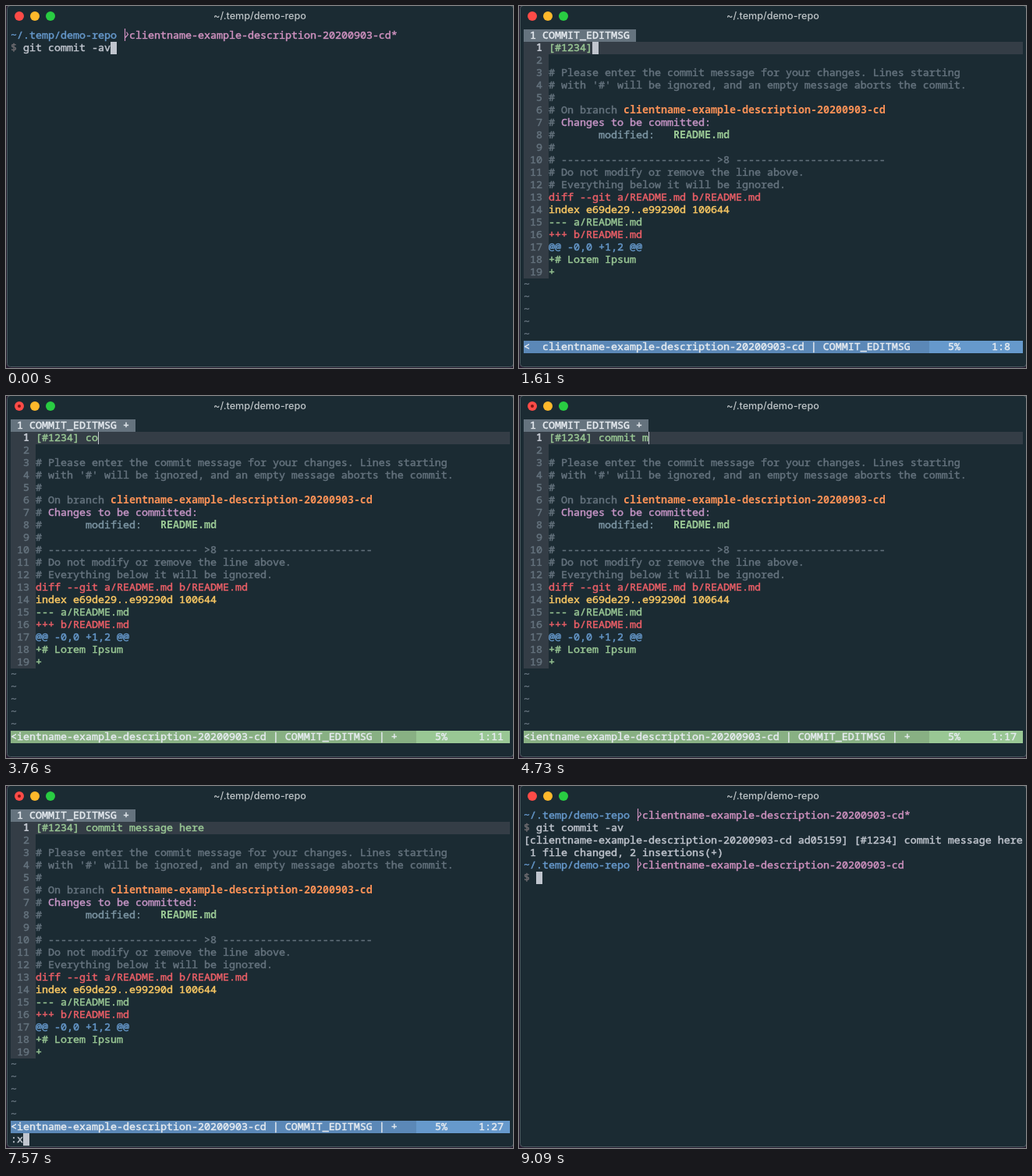
These frames come from a looping animation (650 px wide and 465 px high, 9810 ms). An HTML page with a canvas:

```html
<!DOCTYPE html>
<html lang="en">
<head>
<meta charset="utf-8">
<title>Commit demo</title>
<style>
html, body { margin: 0; width: 100%; height: 100%; overflow: hidden; background: #1b2b33; }
canvas { display: block; }
</style>
</head>
<body>
<canvas id="stage" width="650" height="465"></canvas>
<script>
const ctx = document.getElementById('stage').getContext('2d');
const LOOP = 9810;
const MONO = '13.333px "Noto Sans Mono", "DejaVu Sans Mono", monospace';
const C = {
  bg: '#1b2b33', band: '#343d46', grey: '#65737e', text: '#c0c5ce', white: '#e6ebf0',
  red: '#ec5f67', orange: '#f99157', yellow: '#fac863', green: '#99c794',
  blue: '#6699cc', violet: '#c594c5', pink: '#d092c0', slate: '#7c95a3'
};
const BRANCH = 'clientname-example-description-20200903-cd';
const TICKET = '[#1234] ';
const MESSAGE = 'commit message here';
// Times at which another character shows up; two arrive together at 5340.
const KEYS = [3580, 3760, 3840, 4020, 4110, 4190, 4280, 4730, 4820, 4990,
  5080, 5250, 5340, 5340, 5520, 5690, 5780, 5860, 5950];

// Each line is a list of [column, text, colour, bold].
const rule = '-'.repeat(24);
const hash = [0, '#', C.grey];
const note = s => [[0, '# ' + s, C.grey]];
const BUFFER = [
  [],
  note('Please enter the commit message for your changes. Lines starting'),
  note("with '#' will be ignored, and an empty message aborts the commit."),
  [hash],
  [...note('On branch'), [12, BRANCH, C.orange, true]],
  [hash, [2, 'Changes to be committed:', C.violet]],
  [hash, [8, 'modified:', C.slate], [20, 'README.md', C.green, true]],
  [hash],
  note(`${rule} >8 ${rule}`),
  note('Do not modify or remove the line above.'),
  note('Everything below it will be ignored.'),
  [[0, 'diff --git a/README.md b/README.md', C.red]],
  [[0, 'index e69de29..e99290d 100644', C.yellow]],
  [[0, '--- a/README.md', C.green]],
  [[0, '+++ b/README.md', C.red]],
  [[0, '@@ -0,0 +1,2 @@', C.blue]],
  [[0, '+# Lorem Ipsum', C.green]],
  [[0, '+', C.green]]
];

// Character grid: cells of 8 by 16 pixels.
const cellX = col => 6 + col * 8;
const cellY = row => 30 + row * 16;

function fill(col, row, cols, rows, color) {
  ctx.fillStyle = color;
  ctx.fillRect(cellX(col), cellY(row), cols * 8, rows * 16);
}

// Regular text gets a hairline outline for a medium weight.
function print(col, row, text, color, bold) {
  const x = cellX(col), y = cellY(row) + 12;
  ctx.font = (bold ? '700 ' : '400 ') + MONO;
  ctx.textAlign = 'left';
  ctx.fillStyle = ctx.strokeStyle = color;
  ctx.lineWidth = 0.45;
  ctx.fillText(text, x, y);
  if (!bold) ctx.strokeText(text, x, y);
}

function block(col, row) {
  fill(col, row, 1, 1, C.text);
}

function dot(x, y, r, color) {
  ctx.fillStyle = color;
  ctx.beginPath();
  ctx.arc(x, y, r, 0, 7);
  ctx.fill();
}

function drawWindow(busy) {
  ctx.fillStyle = '#251a2e';
  ctx.fillRect(0, 0, 650, 465);
  ctx.beginPath();
  ctx.roundRect(1.5, -0.5, 649, 464, 4);
  ctx.fillStyle = C.bg;
  ctx.fill();
  ctx.strokeStyle = '#4c5a61';
  ctx.lineWidth = 1;
  ctx.stroke();
  dot(17, 13, 6, '#fc4b47');
  dot(37, 13, 6, '#fdb92b');
  dot(57, 13, 6, '#29cc42');
  if (busy) dot(17, 13, 2, '#7e1512');
  ctx.font = '500 12.6px Inter, "Open Sans", sans-serif';
  ctx.textAlign = 'center';
  ctx.fillStyle = '#bfc5c8';
  ctx.fillText('~/.temp/demo-repo', 325.5, 17);
}

function drawPrompt(row, dirty) {
  const y = cellY(row);
  print(0, row, '~/.temp/demo-repo', C.blue);
  ctx.strokeStyle = C.pink;
  ctx.lineWidth = 1.2;
  ctx.beginPath();
  ctx.moveTo(152.5, y - 1);
  ctx.lineTo(152.5, y + 15);
  ctx.moveTo(153, y + 10.5);
  ctx.lineTo(156.5, y + 6.5);
  ctx.lineTo(154.5, y + 3.5);
  ctx.stroke();
  print(19, row, BRANCH + (dirty ? '*' : ''), C.pink);
  print(0, row + 1, '$', '#6e6c70');
}

function drawShell(t) {
  drawPrompt(0, true);
  print(2, 1, 'git commit -av', C.text);
  if (t < 1340) return block(16, 1);
  if (t < 1430) return block(0, 2);
  print(0, 2, `[${BRANCH} ad05159] ${TICKET}${MESSAGE}`, C.text);
  print(0, 3, ' 1 file changed, 2 insertions(+)', C.text);
  if (t < 8290) return block(0, 4);
  drawPrompt(4, t < 9000);
  block(2, 5);
}

function drawStatus(insert, modified, column) {
  fill(0, 25, 65, 1, insert ? '#88b083' : '#5b88b7');
  fill(65, 25, 15, 1, insert ? C.green : C.blue);
  const left = modified ? `<${BRANCH.slice(2)} | COMMIT_EDITMSG | +`
                        : `<  ${BRANCH} | COMMIT_EDITMSG`;
  print(0, 25, left, C.white);
  print(68, 25, '5%', C.white);
  print(75, 25, '1:' + column, C.white);
}

function drawEditor(t) {
  const typed = KEYS.filter(k => t >= k).length;
  const insert = t >= 2950 && t < 6670;
  const command = t >= 7300;
  const end = TICKET.length + typed;

  fill(0, 0, typed ? 20 : 18, 1, C.grey);
  print(1, 0, '1 COMMIT_EDITMSG' + (typed ? ' +' : ''), C.white);
  fill(0, 1, 80, 1, C.band);
  fill(0, 2, 4, 18, C.band);

  print(2, 1, '1', C.text, true);
  print(4, 1, TICKET + MESSAGE.slice(0, typed), C.green);
  BUFFER.forEach((line, i) => {
    const number = i + 2;
    print(1, number, String(number).padStart(2), C.grey);
    for (const [col, text, color, bold] of line) print(4 + col, number, text, color, bold);
  });
  for (let row = 20; row < 25; row++) print(0, row, '~', C.grey);
  drawStatus(insert, typed > 0, insert ? end + 1 : end);

  if (insert) {
    ctx.fillStyle = C.text;
    ctx.fillRect(cellX(4 + end), cellY(1), 1, 16);
  } else if (command) {
    const entry = t < 7570 ? ':' : ':x';
    print(0, 26, entry, C.text);
    block(entry.length, 26);
  } else {
    block(3 + end, 1);
    if (typed) print(3 + end, 1, MESSAGE[typed - 1], C.bg);
  }
}

function frame() {
  const t = performance.now() % LOOP;
  drawWindow(t >= 2050 && t < 8910);
  if (t < 1430 || t >= 8200) drawShell(t);
  else if (t < 1610) block(0, 0);
  else drawEditor(t);
  requestAnimationFrame(frame);
}
frame();
</script>
</body>
</html>
```
